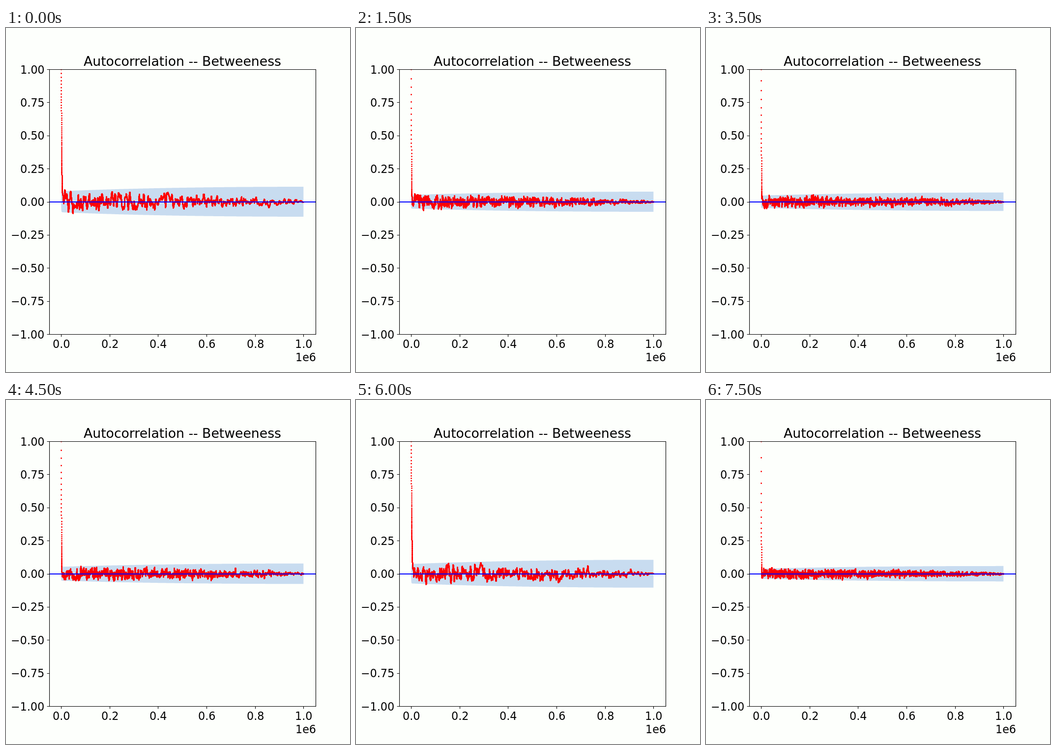
Recreate the animation shown at these times as an HTML page with a canvas. Size 700 by 700 pixels, loop 8000 ms.

```html
<!DOCTYPE html>
<html lang="en">
<head>
<meta charset="utf-8">
<title>Autocorrelation</title>
<style>
html, body { margin: 0; width: 100%; height: 100%; overflow: hidden; background: #fdfffc; }
canvas, svg { position: absolute; left: 0; top: 0; width: 700px; height: 700px; }
text { font-family: "DejaVu Sans", sans-serif; fill: #000; }
</style>
</head>
<body>
<canvas id="plot" width="700" height="700"></canvas>
<svg id="axes" viewBox="0 0 700 700"></svg>
<script>
const STEP = 500, LAGS = 20000, BEND = .96;
const X0 = 112.16, XW = 493.18, Y0 = 353.5, YU = 269.5;

// Correlation at lag 1 for each run; all else follows from it
const runs = [.97, .948, .937, .93, .965, .934, .918, .915, .96, .932, .912, .89, .965, .931, .893, .874];

const ctx = document.getElementById("plot").getContext("2d");
const lagX = k => X0 + XW * k / LAGS;

function rng(seed) {
  return () => {
    seed = (seed + 0x6D2B79F5) | 0;
    let t = Math.imul(seed ^ (seed >>> 15), 1 | seed);
    t = (t + Math.imul(t ^ (t >>> 7), 61 | t)) ^ t;
    return ((t ^ (t >>> 14)) >>> 0) / 4294967296;
  };
}

// Smooth noise with the same memory as the decay, fading towards the last lag
function makeNoise(seed, memory, sigma, limit) {
  const rand = rng(seed), v = new Float64Array(LAGS);
  let a = 0, b = 0, sum = 0;
  for (let k = -300; k < LAGS; k++) {
    a = memory * a + rand() + rand() + rand() - 1.5;
    b = memory * b + a;
    if (k >= 0) { v[k] = b; sum += b * b; }
  }
  const gain = sigma / Math.sqrt(sum / LAGS);
  return v.map((n, k) => limit * Math.tanh(n * gain * Math.sqrt(1 - k / LAGS) / limit));
}

function drawBand(half) {
  const ks = [];
  for (let k = 1; k < LAGS; k += k < 400 ? 5 : 100) ks.push(k);
  ks.push(LAGS);
  ctx.fillStyle = "#c8dcf0";
  ctx.beginPath();
  for (const k of ks) ctx.lineTo(lagX(k), Y0 - half(k));
  for (const k of ks.reverse()) ctx.lineTo(lagX(k), Y0 + half(k));
  ctx.fill();
}

// Dots sit on whole pixels
function drawDots(rho, noise) {
  const seen = new Set();
  ctx.fillStyle = "#f00";
  for (let k = 0; k < LAGS; k++) {
    const r = rho(k);
    const x = Math.round(lagX(k));
    const y = Math.round(Y0 - r * YU - noise[k] * (1 - r));
    const key = x * 1000 + y;
    if (seen.has(key)) continue;
    seen.add(key);
    ctx.beginPath();
    ctx.arc(x + .5, y + .5, 1.39, 0, 7);
    ctx.fill();
  }
}

function drawRun(index) {
  const first = runs[index];
  const spread = Math.sqrt((1 + first ** 2) / (1 - first ** 2));
  const base = 3.735, start = base * spread, last = 2.1 + 4.95 * spread;
  const rho = k => first ** (k ** BEND);
  const half = k => Math.sqrt(base ** 2
    + (start ** 2 - base ** 2) * (1 - rho(k) ** 2)
    + (last ** 2 - start ** 2) * (1 - (1 - k / LAGS) ** 2));

  ctx.clearRect(0, 0, 700, 700);
  ctx.save();
  ctx.beginPath();
  ctx.rect(88, 84, 542, 539);
  ctx.clip();
  drawBand(half);
  drawDots(rho, makeNoise(index * 7919 + 17, first, start / 1.96, last * 1.05));
  ctx.restore();
}

// Text starts on a whole pixel; align is 0 for left, .5 for centre, 1 for right
function label(x, y, align, s, size = 22.22) {
  ctx.font = `${size}px "DejaVu Sans", sans-serif`;
  const left = Math.ceil(x - ctx.measureText(s).width * align);
  return `<text x="${left}" y="${y}" font-size="${size}">${s}</text>`;
}

function drawAxes() {
  let out = '<path d="M88 354H630" stroke="#00f" stroke-width="2.08"/>';
  let d = "M88.5 84.5H630.5V623.5H88.5Z";
  for (let i = 0; i <= 5; i++) {
    const x = X0 + XW * i / 5;
    d += `M${Math.round(x) + .5} 623.5v5`;
    out += label(x, 651, .5, (i / 5).toFixed(1));
  }
  for (let i = 0; i <= 8; i++) {
    const y = 84 + i * YU / 4, value = 1 - i / 4;
    d += `M88.5 ${Math.round(y) + .5}h-5`;
    out += label(77.8, Math.round(y + 8.5), 1, value.toFixed(2).replace("-", "\u2212"));
  }
  out += `<path d="${d}" fill="none" stroke="#000" stroke-width="1.11"/>`;
  out += label(630, 678, 1, "1e6");
  out += label(358.75, 77, .5, "Autocorrelation -- Betweeness", 26.67);
  document.getElementById("axes").innerHTML = out;
}

let shown = -1;
function tick() {
  const index = Math.floor(performance.now() / STEP) % runs.length;
  if (index !== shown) drawRun(shown = index);
  requestAnimationFrame(tick);
}

drawAxes();
tick();
</script>
</body>
</html>
```
